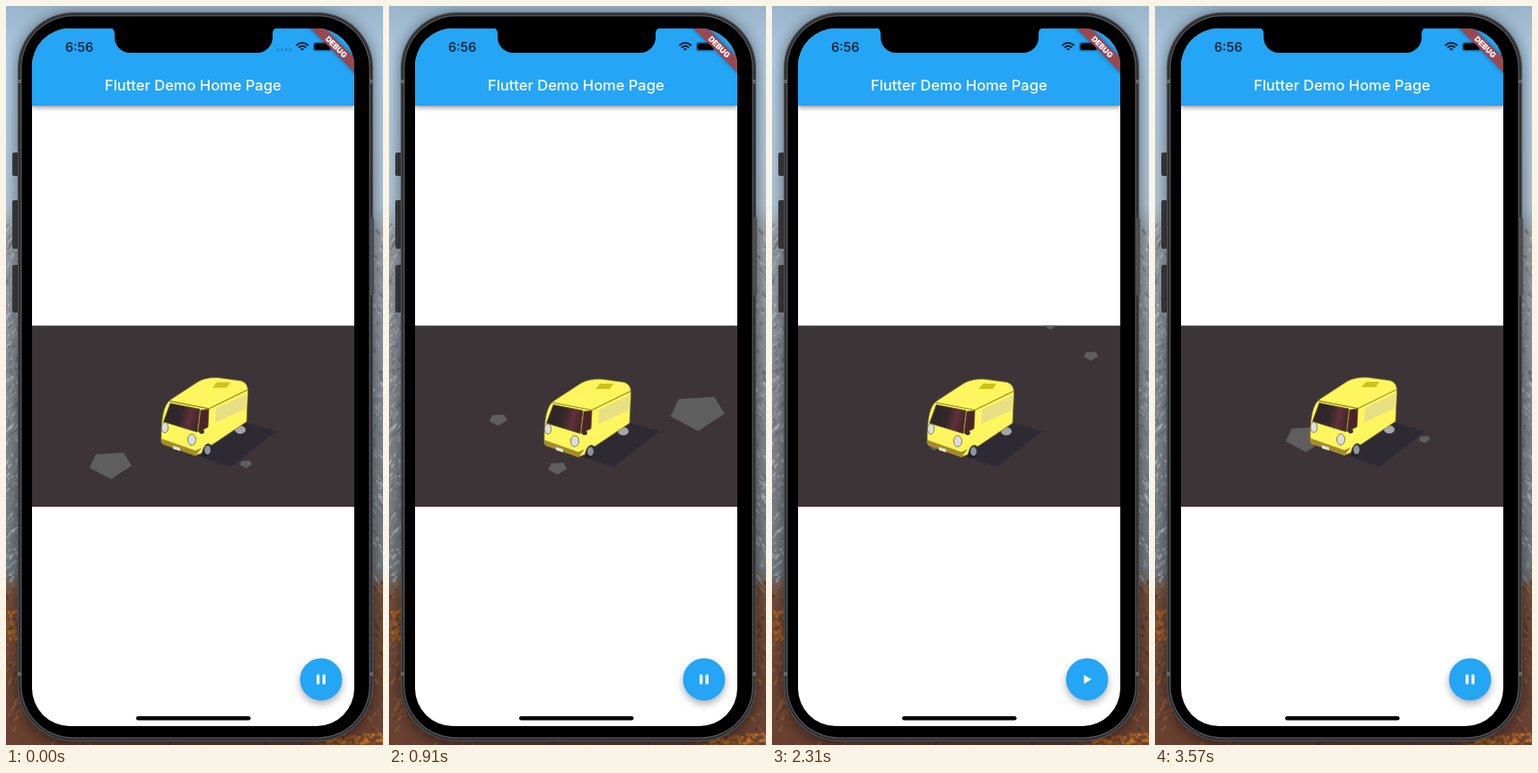
Write an HTML page with a canvas that moves like this. It is 420 px wide and 822 px high and loops after 3640 ms.

```html
<!DOCTYPE html>
<html lang="en">
<head>
<meta charset="utf-8">
<title>Van animation</title>
<style>
  html, body { margin: 0; width: 100%; height: 100%; overflow: hidden; background: #000; }
  canvas { display: block; width: 420px; height: 822px; }
</style>
</head>
<body>
<canvas id="stage" width="420" height="822"></canvas>
<script>
const W = 420, H = 822;
const LOOP = 3640;
const CYCLE = 2110;             // length of the driving scene
const PAUSE_AT = 1525, RESUME_AT = 2848;
const BLUE = '#24a5f5';
const ctx = document.getElementById('stage').getContext('2d');

let seed = 7;
const random = () => (seed = (seed * 16807) % 2147483647) / 2147483647;
const pick = list => list[Math.floor(random() * list.length)];
const lerp = (a, b, k) => a + (b - a) * k;
const clamp = v => Math.max(0, Math.min(1, v));

function poly(c, pts, fill, stroke, width = 1) {
  c.beginPath();
  for (let i = 0; i < pts.length; i += 2) c.lineTo(pts[i], pts[i + 1]);
  if (fill) { c.closePath(); c.fillStyle = fill; c.fill(); }
  if (stroke) { c.strokeStyle = stroke; c.lineWidth = width; c.stroke(); }
}

function box(c, x, y, w, h, r, fill) {
  c.beginPath();
  c.roundRect(x, y, w, h, r);
  c.fillStyle = fill;
  c.fill();
}

function oval(c, x, y, rx, ry, fill, stroke) {
  c.beginPath();
  c.ellipse(x, y, rx, ry, 0, 0, 7);
  c.fillStyle = fill;
  c.fill();
  if (stroke) { c.strokeStyle = stroke; c.lineWidth = 0.8; c.stroke(); }
}

function shadow(c, color, blur, dy) {
  c.shadowColor = color;
  c.shadowBlur = blur;
  c.shadowOffsetY = dy;
}

function gradient(c, x0, y0, x1, y1, ...stops) {
  const g = c.createLinearGradient(x0, y0, x1, y1);
  stops.forEach(([at, color]) => g.addColorStop(at, color));
  return g;
}

function drawLandscape(c) {
  c.fillStyle = gradient(c, 0, 0, 0, H, [0, '#9ab5ca'], [0.08, '#b2cfe7'], [0.27, '#b4c9da'],
    [0.31, '#9ba4ac'], [0.5, '#8a929a'], [0.76, '#747d83'], [0.8, '#72503c'], [1, '#694030']);
  c.fillRect(0, 0, W, H);
  const rock = ['#c9d0d7', '#616a73', '#a7afb7', '#7b848d'];
  const forest = ['#8a5639', '#4a2d24', '#a4673f', '#6d4433'];
  c.globalAlpha = 0.55;
  for (let i = 0; i < 1300; i++) {
    const y = lerp(240, H, random());
    const x = y > 790 ? random() * W : (random() * 60 + 390) % W;
    c.save();
    c.translate(x, y);
    c.rotate(x < W / 2 ? 0.6 : -0.6);
    c.fillStyle = pick(y < 640 ? rock : forest);
    c.fillRect(0, 0, 1 + random() * 2, 2 + random() * 6);
    c.restore();
  }
  for (let i = 0; i < 130; i++) {
    c.fillStyle = pick(['#c97726', '#a75c22']);
    if (i % 3) c.fillRect(lerp(340, W, random()), lerp(807, H, random()), 4, 3);
    else c.fillRect(random() * 14, lerp(672, 704, random()), 3, 3);
  }
  c.globalAlpha = 1;
}

function drawPhone(c) {
  [[163, 26], [216, 54], [288, 53]].forEach(([y, h]) => box(c, 7, y, 8, h, 2, '#3f4043'));

  c.save();
  shadow(c, 'rgba(0,0,0,.55)', 18, 3);
  box(c, 13, 7, 396, 811, 62, '#4a4b4e');
  c.restore();
  ['#28292b', '#515255', '#000'].forEach((color, i) => {
    const inset = 1.5 * (i + 1);
    box(c, 13 + inset, 7 + inset, 396 - 2 * inset, 811 - 2 * inset, 62 - inset, color);
  });
  c.fillStyle = '#65666a';
  for (const x of [13, 405]) for (const y of [82, 741]) c.fillRect(x, y, 4, 4);
  box(c, 405, 235, 5, 87, 2, '#4d4e52');

  c.save();
  box(c, 29, 25, 359, 776, 42, '#fff');
  c.clip();
  c.save();
  shadow(c, 'rgba(0,0,0,.4)', 5, 2);
  c.fillStyle = BLUE;
  c.fillRect(29, 25, 359, 86);
  c.restore();
  drawStatusBar(c);
  c.restore();

  // notch with flared upper corners
  c.fillStyle = '#000';
  c.beginPath();
  c.moveTo(115, 24);
  c.arcTo(121, 24, 121, 30, 6);
  c.arcTo(121, 52, 139, 52, 17);
  c.arcTo(297, 52, 297, 34, 17);
  c.arcTo(297, 24, 303, 24, 6);
  c.lineTo(303, 24);
  c.fill();

  c.fillStyle = '#fff';
  c.textAlign = 'center';
  c.font = '500 16.5px Inter, sans-serif';
  c.fillText('Flutter Demo Home Page', 208.3, 94);
  box(c, 145, 790, 127.5, 4.4, 2.2, '#000');
}

function drawStatusBar(c) {
  c.fillStyle = '#06263c';
  c.font = '600 14.2px Inter, sans-serif';
  c.fillText('6:56', 66, 50.5);

  c.strokeStyle = '#041c30';
  c.lineWidth = 2;
  for (const r of [9, 5.5, 2]) {
    c.beginPath();
    c.arc(330, 50, r, -Math.PI * 0.77, -Math.PI * 0.23);
    c.stroke();
  }
  box(c, 342, 40, 21, 10.5, 3, 'rgba(4,28,48,.35)');
  box(c, 343.5, 41.5, 18, 7.5, 2, '#000');

  c.save();
  c.translate(368, 45.5);
  c.rotate(Math.PI / 4);
  c.fillStyle = '#9d4650';
  shadow(c, 'rgba(0,0,0,.45)', 4, 0);
  c.fillRect(-50, -5.4, 100, 11);
  c.shadowColor = 'transparent';
  c.fillStyle = '#fff';
  c.textAlign = 'center';
  c.font = '900 8.6px Inter, sans-serif';
  c.fillText('DEBUG', 0, 3.2);
  c.restore();
}

// Where each stone is at one moment, and its speed in pixels per ms.
const stones = [
  { at: 0, x: 116, y: 512, vx: 0.375, vy: -0.214, size: 47 },
  { at: 0, x: 267, y: 510, vx: 0.24, vy: -0.2, size: 13.5 },
  { at: 560, x: 239.5, y: 530.5, vx: 0.297, vy: -0.218, size: 70 },
  { at: 910, x: 121.5, y: 461, vx: 0.307, vy: -0.172, size: 20 },
  { at: 910, x: 187.5, y: 515, vx: 0.273, vy: -0.204, size: 21 },
  { at: 1470, x: 164, y: 502.5, vx: 0.304, vy: -0.198, size: 9.5 }
];
const stoneShape = [-0.5, 0.04, -0.35, -0.28, 0.31, -0.32, 0.5, -0.01, 0.01, 0.31];

function drawStone(stone, time) {
  const dt = time - stone.at;
  const x = stone.x + stone.vx * dt, y = stone.y + stone.vy * dt;
  const size = stone.size * Math.exp(-0.00043 * dt);
  poly(ctx, stoneShape.map((v, i) => v * size + (i % 2 ? y : x)), '#5f5e5f');
}

function drawVan(phase) {
  const c = ctx;
  const sinceBump = (phase + 500) % CYCLE - 590;
  c.save();
  c.translate(0, -2 * Math.exp(-((sinceBump / 190) ** 2)));

  // wheels
  oval(c, 261, 473, 6, 4.5, '#a4a4aa');
  oval(c, 222.5, 496, 5.5, 7, '#20212a');
  oval(c, 224.5, 495.5, 3.4, 5, '#8f93a0');

  // shell
  c.beginPath();
  c.moveTo(173, 487);
  c.quadraticCurveTo(172, 446, 184, 439);
  c.lineTo(214, 419.5);
  c.quadraticCurveTo(223, 414.5, 236, 415);
  c.lineTo(262, 418.5);
  c.quadraticCurveTo(270, 421, 269.5, 431);
  c.lineTo(268, 464);
  c.lineTo(229, 490);
  c.quadraticCurveTo(222, 484, 218, 499);
  c.lineTo(211, 501.5);
  c.closePath();
  c.fillStyle = '#fef65f';
  c.fill();
  c.strokeStyle = '#837a29';
  c.lineWidth = 0.8;
  c.stroke();
  poly(c, [182, 441, 226, 449.5, 269, 428.5], null, '#8d8327', 1.1);
  poly(c, [230, 426, 235, 420, 250, 420, 246, 426], '#cdc21b');
  poly(c, [234, 449, 268, 433, 267, 449.5, 233, 465], '#e8de83');

  // glass
  poly(c, [175.5, 464, 183, 443.5, 216, 450, 213, 475.5],
    gradient(c, 176, 455, 216, 465, [0, '#2b2528'], [0.45, '#33272b'], [0.7, '#60303a'], [1, '#3b2428']),
    '#5d551e', 0.8);
  poly(c, [217, 451, 226, 450, 225, 470, 214, 475.5], '#4c232a', '#5d551e', 0.7);
  oval(c, 218, 475, 2.8, 2.3, '#31313a');

  // front
  poly(c, [172.5, 482.5, 211, 496, 218, 493, 211, 502, 174, 489], '#a48b2d');
  poly(c, [186, 490.5, 194, 493, 194, 496.5, 186, 494], '#e5e2cd');
  oval(c, 177, 470.5, 3.7, 5.8, '#dcdce2', '#6e6933');
  oval(c, 207, 484, 4.5, 6.2, '#dcdce2', '#6e6933');
  c.restore();
}

function drawScene(phase) {
  ctx.save();
  ctx.beginPath();
  ctx.rect(29, 355.5, 359, 201.5);
  ctx.clip();
  ctx.fillStyle = '#3d3437';
  ctx.fillRect(29, 355, 359, 203);
  poly(ctx, [212, 500, 250, 513, 301, 473, 266, 463], '#2d2a34');
  for (const stone of stones) {
    drawStone(stone, phase);
    drawStone(stone, phase - CYCLE);
  }
  drawVan(phase);
  ctx.restore();
}

function drawButton(t) {
  const tap = t < 2400 ? t - 1480 : t - 2780;
  const pressed = clamp(tap / 100) * (1 - clamp((tap - 200) / 220));
  ctx.save();
  shadow(ctx, 'rgba(0,0,0,.32)', lerp(9, 16, pressed), lerp(4, 8, pressed));
  oval(ctx, 351, 749, 23.5, 23.5, BLUE);
  ctx.restore();

  if (pressed > 0) {
    const grow = clamp(tap / 240);
    ctx.save();
    ctx.beginPath();
    ctx.arc(351, 749, 23.5, 0, 7);
    ctx.clip();
    oval(ctx, 351, lerp(776, 758, grow), 42 * grow, 42 * grow, `rgba(255,255,255,${0.33 * pressed})`);
    ctx.restore();
  }

  if (t >= PAUSE_AT && t < RESUME_AT) {
    poly(ctx, [347.5, 744, 356, 749, 347.5, 754], '#fff');
  } else {
    for (const x of [346, 352.6]) box(ctx, x, 743.5, 3.3, 11, 1, '#fff');
  }
}

const backdrop = document.createElement('canvas');
backdrop.width = W;
backdrop.height = H;
const back = backdrop.getContext('2d');
drawLandscape(back);
drawPhone(back);

function sceneTime(t) {
  if (t < PAUSE_AT) return t;
  return (PAUSE_AT + Math.max(0, t - RESUME_AT)) % CYCLE;
}

function render(now) {
  const t = now % LOOP;
  ctx.drawImage(backdrop, 0, 0);
  if (t < 70) {
    for (let i = 0; i < 4; i++) oval(ctx, 303 + i * 4.6, 48.5, 1.3, 1.3, 'rgba(4,40,80,.3)');
  }
  drawScene(sceneTime(t));
  drawButton(t);
  requestAnimationFrame(render);
}
requestAnimationFrame(render);
</script>
</body>
</html>
```
